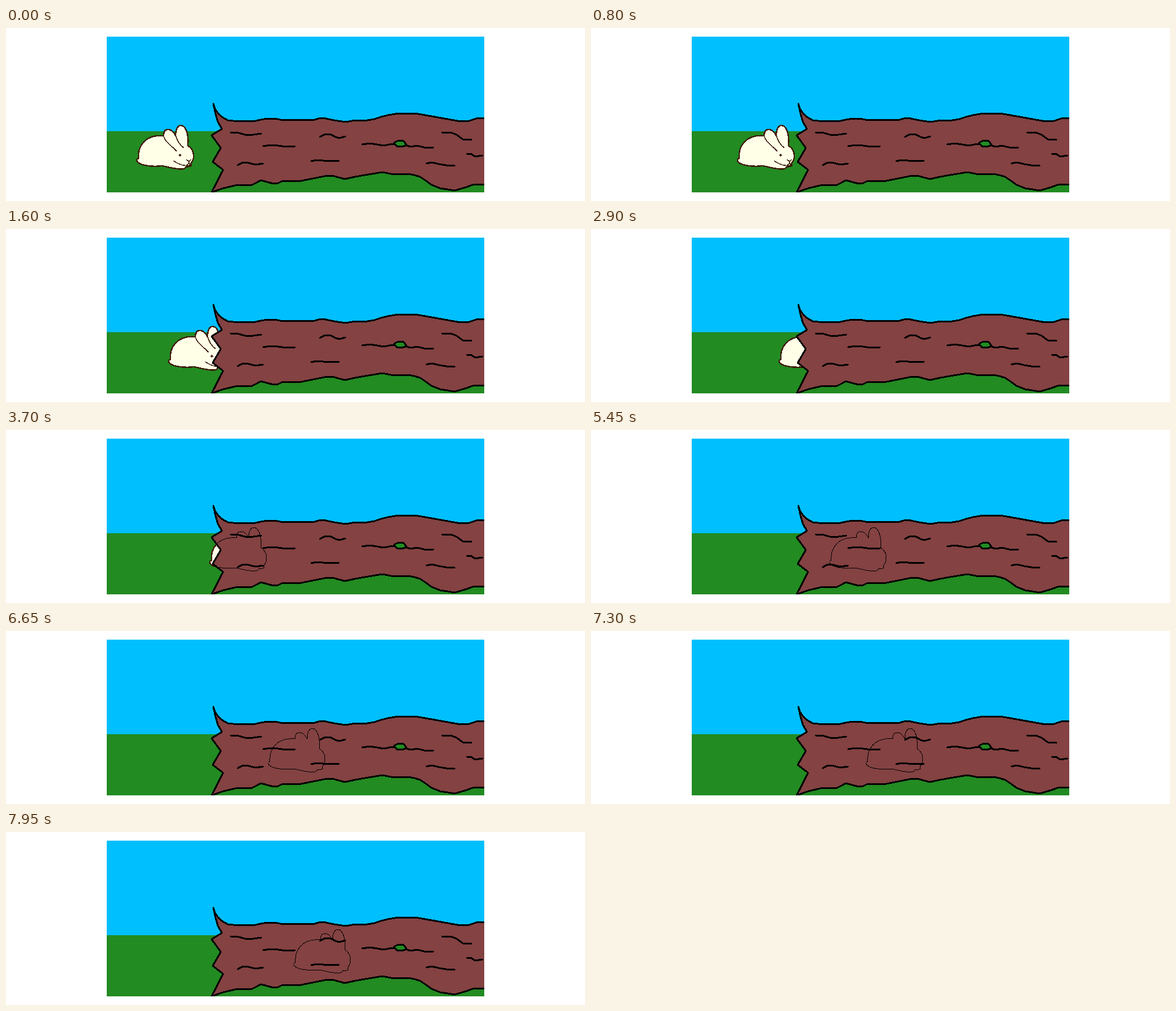
Animation of 1000x300 px, one loop 8000 ms. Source, as an HTML page:

```html
<!DOCTYPE html>
<html lang="en">
<head>
<meta charset="utf-8">
<title>Rabbit and log</title>
<style>
  html, body { margin: 0; width: 100%; height: 100%; overflow: hidden; background: #fff; }
  svg { display: block; width: 1000px; height: 300px; stroke-linecap: round; stroke-linejoin: round; }
  .ink { stroke: #3f1d06; stroke-width: 2.4; }
  .bark { stroke: #000; stroke-width: 3; }
</style>
</head>
<body>
<svg viewBox="0 0 1000 300" shape-rendering="crispEdges">
  <defs>
    <clipPath id="scene"><rect x="174" y="15" width="652" height="270"/></clipPath>
    <path id="log" d="M358 131L361 140 367 149 374 155 383 160 392 161 427 162 440 159 452 157 463 157 480 160 493 159 507 159 530 160 540 157 548 156 557 158 567 160 586 163 604 160 618 161 636 158 648 154 660 151 672 149 685 148 712 149 735 153 757 157 785 162 800 161 815 156 840 156
      V271L806 272 795 276 775 282 763 280 750 278 735 272 724 264 715 258 705 255 695 253 670 254 650 250 620 255 603 258 585 262 567 257 555 256 530 261 505 266 478 265 470 269 462 270 440 264 433 268 425 272 400 272 375 278 355 285
      L375 246 357 232 371 208 355 186 373 175 366 163 362 149Z"/>
    <clipPath id="inside"><use href="#log"/></clipPath>
    <path id="body" d="M272 187C272 180 275 176 280 176C286 176 290 181 293 187C293 177 296 169 302 169C310 169 316 183 314 204C321 208 324 215 324 222C324 228 322 232 319 235L320 239C317 241 313 240 310 241C311 245 301 245 295 244C284 243 278 240 269 239C255 241 229 239 226 230C225 228 227 227 229 226C227 205 241 184 272 187Z"/>
  </defs>
  <g clip-path="url(#scene)">
    <rect x="174" y="15" width="652" height="270" fill="#228b22"/>
    <rect x="174" y="15" width="652" height="164" fill="#00bfff"/>
    <g class="mover">
      <use href="#body" class="ink" fill="#ffffe8"/>
      <path class="ink" fill="none" style="stroke-width:1.5" d="M272 187C275 198 284 202 294 213M293 186C296 196 299 201 306 207M290 231C298 235 303 240 319 238M312 229L316 231 319 229M316 231V235L313 237M316 235L319 237"/>
      <circle cx="300.5" cy="220.5" r="2.2" fill="#3f1d06"/>
    </g>
    <use href="#log" class="bark" fill="#844242"/>
    <g id="ghost" clip-path="url(#inside)">
      <use href="#body" class="mover" fill="none" stroke="#000"/>
    </g>
    <path class="bark" fill="none" d="M388 181H398L413 185 427 185 441 183M444 205L456 203 470 204 484 206 499 205M400 238L409 233 419 234 431 237 444 235M542 189L551 184 560 184 569 189 576 191 586 188M527 231L536 229 548 230 562 231 575 230M615 202L628 200 641 202 652 204 662 202 673 201M692 204L699 206 710 204 722 207 738 207M726 235L735 233 748 236 760 238 775 239M753 181L768 181 778 185 789 193 804 194M796 218H803L810 223 823 221"/>
    <path class="bark" fill="#228b22" d="M670 199L678 195 687 196 692 203 684 206 675 205Z"/>
  </g>
</svg>
<script>
  const LOOP = 8000, TICK = 50, SPEED = 29 / 850, GHOST_START = 3150;
  const movers = document.querySelectorAll('.mover');
  const ghost = document.getElementById('ghost');

  function draw(now) {
    const t = Math.floor(now % LOOP / TICK) * TICK;
    const x = Math.round(t * SPEED);
    movers.forEach(m => m.setAttribute('transform', `translate(${x} 0)`));
    ghost.style.display = t < GHOST_START ? 'none' : '';
    requestAnimationFrame(draw);
  }
  draw(performance.now());
</script>
</body>
</html>
```
